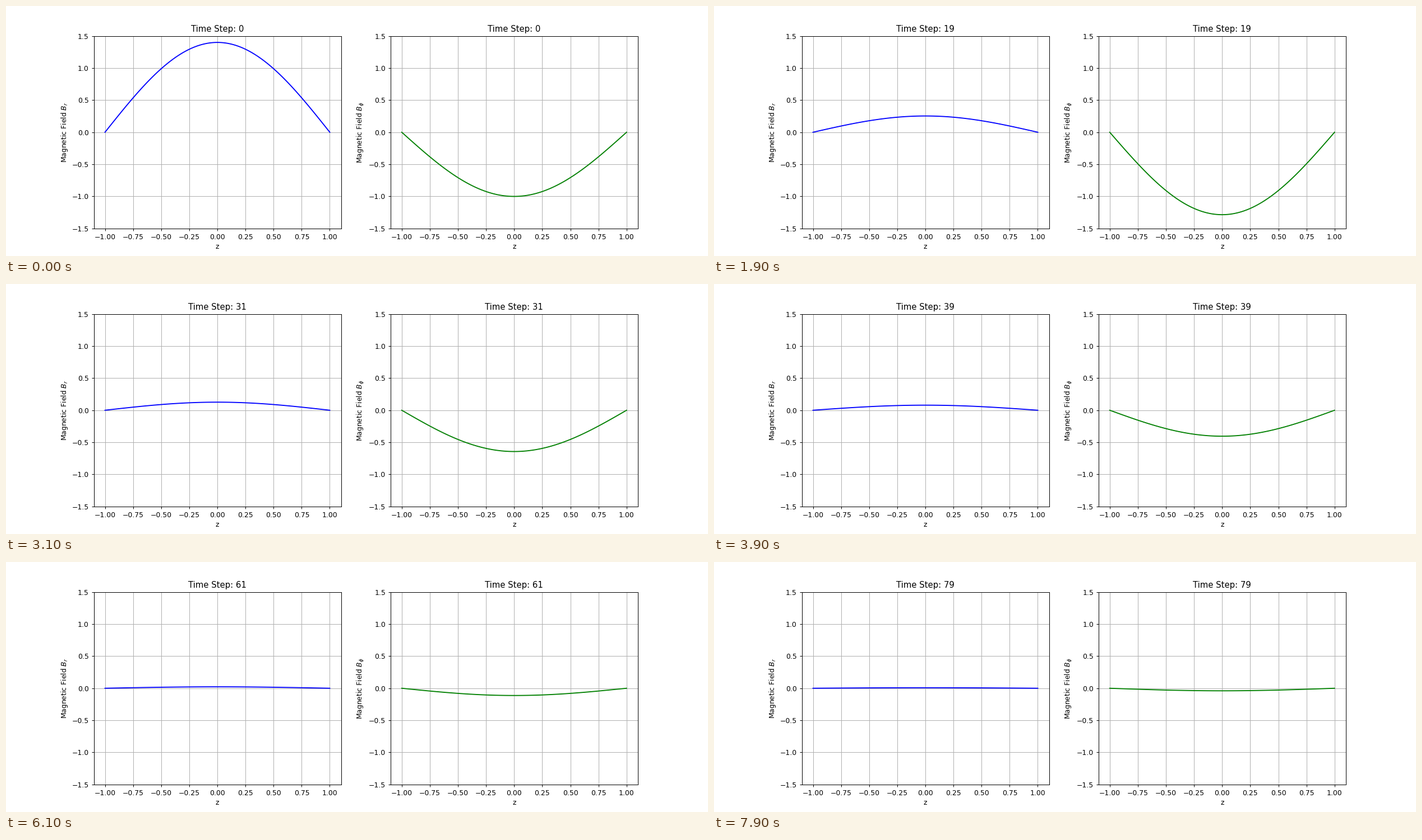
A matplotlib script for the animation above (8000 ms loop, 1252 by 447 pixels).

```python
import numpy as np
import matplotlib.pyplot as plt
from matplotlib.animation import FuncAnimation

WIDTH, HEIGHT = 1252, 447
DPI = WIDTH / 14  # a layout 14 inches wide
STEPS, INTERVAL = 80, 100
SLOW, FAST = 0.058, 0.33  # decay rates of the two coupled modes

z = np.linspace(-1, 1, 100)
profile = np.cos(np.pi * z / 2)


def amplitudes(step):
    """Peak values of the radial and azimuthal field at a time step."""
    slow, fast = np.exp(-SLOW * step), np.exp(-FAST * step)
    return 0.76 * slow + 0.64 * fast, -3.884 * slow + 2.884 * fast


def make_panel(ax, color, symbol):
    line, = ax.plot(z, profile, color=color)
    ax.set_xlim(-1.1, 1.1)
    ax.set_ylim(-1.5, 1.5)
    ax.set_xlabel("z")
    ax.set_ylabel(f"Magnetic Field ${symbol}$")
    ax.grid(True)
    return line


# The small surplus keeps float rounding from losing a pixel.
size = ((WIDTH + 0.001) / DPI, (HEIGHT + 0.001) / DPI)
fig, axes = plt.subplots(1, 2, figsize=size, dpi=DPI)
lines = [
    make_panel(axes[0], "blue", "B_r"),
    make_panel(axes[1], "green", r"B_\phi"),
]


def update(step):
    for ax, line, peak in zip(axes, lines, amplitudes(step)):
        line.set_ydata(peak * profile)
        ax.set_title(f"Time Step: {step}")
    return lines


anim = FuncAnimation(fig, update, frames=STEPS, interval=INTERVAL,
                     init_func=lambda: update(0), repeat=True)
plt.show()
```
